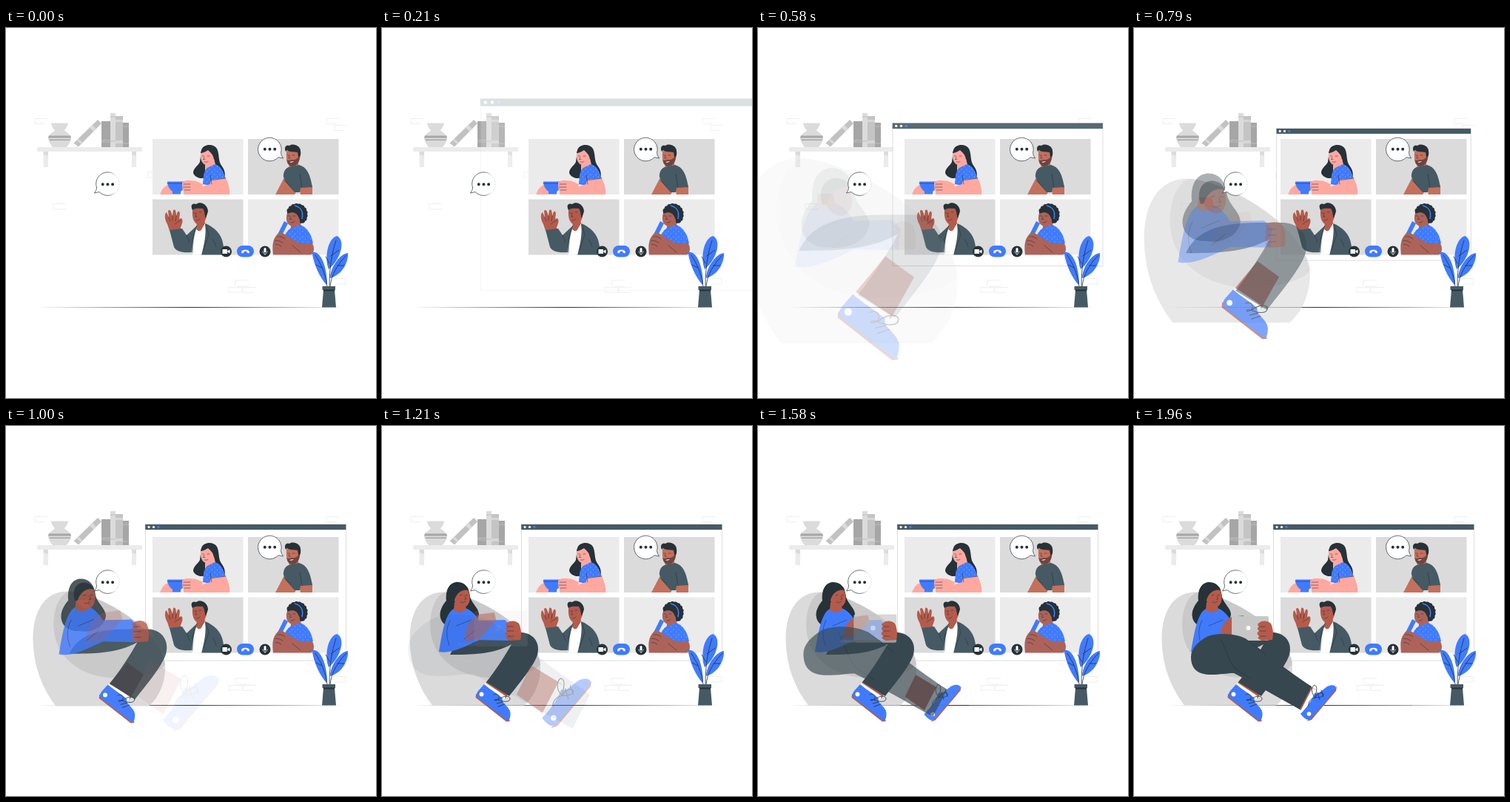
Animation, 500 px wide and 500 px high, one loop 2 s. Source, as an HTML page:

```html
<!DOCTYPE html>
<html lang="en">
<head>
<meta charset="utf-8">
<title>Video call</title>
<style>
html, body { margin: 0; width: 100%; height: 100%; overflow: hidden; background: #fff; }
svg { display: block; width: 100vw; height: 100vh; }
.blue { fill: #407bff; }
.dark { fill: #263238; }
.slate { fill: #455a64; }
.pant { fill: #37474f; }
.rose { fill: #ffa8a0; }
.tan { fill: #c4705c; }
.brown { fill: #ad6359; }
.skin { fill: #b55b4b; }
.white { fill: #fff; }
.line { fill: none; stroke: #263238; stroke-width: .8; stroke-linecap: round; stroke-linejoin: round; }
.thin { stroke-width: .55; }
.brick { fill: none; stroke: #e9e9e9; stroke-width: .7; }
</style>
</head>
<body>
<svg viewBox="0 0 500 500">
<defs>
  <pattern id="dots" width="7" height="7" patternUnits="userSpaceOnUse">
    <rect width="7" height="7" fill="#407bff"/>
    <circle cx="2" cy="2" r=".45" fill="#fff"/><circle cx="5.500" cy="5" r=".45" fill="#fff"/>
  </pattern>
  <linearGradient id="fade"><stop offset=".55" stop-color="#263238"/><stop offset=".85" stop-color="#e0e0e0"/></linearGradient>
  <clipPath id="upper"><path d="M198 150H450V225H198Z"/></clipPath>
  <clipPath id="lower"><path d="M198 231.500H450V306.500H198Z"/></clipPath>
</defs>

<!-- room -->
<path class="brick" d="M56 122.500H39V129.500H52M80 237.500H64V245H82M205 194.500H191.500V202H200M451 122.500H433V129.500H447M461 131.500H443.500V138.500H456M310 349V341H328M312 349H329M301 350.500H319V357H301ZM338 350.500H320V357.500H335M443 338.500H459V346H446"/>
<path class="dark" d="M41 377.500L249 377L457 377.500L249 378Z"/>
<path fill="#ebebeb" d="M42.500 161H184V167H42.500ZM50.500 167H57V188H50.500ZM170 167H176V188H170Z"/>
<path fill="#dbdbdb" d="M50.500 167H57V173L50.500 171ZM170 167H176V173L170 171Z"/>
<path fill="#dbdbdb" d="M61 128.500H84C83 135 80 137 79 138C82 142 88 144 88 148C88 154 84 158 82 161H63C61 158 57 154 57 148C57 144 63 142 66 138C65 137 62 135 61 128.500Z"/>
<path fill="#a6a6a6" d="M58 145.500H87L88 148.500H57ZM58.500 150.500H87L86.500 152H59Z"/>
<path fill="#c2c2c2" d="M124 124L129 129L98 160.500L91.500 155.500Z"/>
<path fill="#dbdbdb" d="M117 131L121.500 136L118 139.500L113 135ZM98 150L103 154.500L101 156.500L96 152Z"/>
<path fill="#a6a6a6" d="M129 126H141V161H129ZM158 128H166V161H158Z"/>
<path fill="#dbdbdb" d="M141 115H148V161H141Z"/>
<path fill="#c4c4c4" d="M148 119H158V161H148Z"/>
<path fill="none" stroke="#bdbdbd" d="M129 151.500H141M129 154H141M141 120H148M141 153H148M158 133H166M158 156H166"/>
<path fill="#d6d6d6" d="M148 124H158V127H148ZM148 152H158V156H148Z"/>

<!-- call window -->
<g id="window">
  <rect class="white" x="188.500" y="133" width="271" height="184" stroke="#c7c7c7" stroke-width=".6"/>
  <rect class="slate" x="188.200" y="133" width="271.200" height="7.200"/>
  <circle class="white" cx="193" cy="136.600" r="1.600"/><circle class="white" cx="199.500" cy="136.600" r="1.600"/>
  <circle class="blue" cx="206" cy="136.600" r="1.600"/>
</g>
<path fill="#ebebeb" d="M198 150H320.500V225H198ZM327 231.500H449.500V306.500H327Z"/>
<path fill="#dbdbdb" d="M327 150H449.500V225H327ZM198 231.500H320.500V306.500H198Z"/>

<g clip-path="url(#upper)">
  <!-- woman with bowl -->
  <path class="dark" d="M264 165C266 157 280 155 285 163C289 171 286 180 292 187C297 194 297 202 293 206L270 202C262 205 255 201 253 196C253 189 260 186 262 181Z"/>
  <path class="rose" d="M269 181L269 196L284 189L281 176Z"/>
  <path class="rose" d="M263 169C266 164 276 163 280 169C283 176 278 184 273 185C266 186 262 179 263 169Z"/>
  <path class="dark" d="M263 169C264 159 281 156 285 167C286 174 283 180 281 177C280 171 276 168 273 165C270 167 266 169 263 169Z"/>
  <path class="line thin" d="M265 173H267.500M272 173H275M268 174.500L266.500 177.500H269M268.500 181Q271 182 273 180.500"/>
  <path fill="url(#dots)" d="M272 189L282 184C291 186 294 195 297 204L277 208L276 213L266 211C267 203 266 195 272 189Z"/>
  <path class="rose" d="M277 205L297 203C301 211 303 219 302 226H240L240 219C252 219 262 215 276 211Z"/>
  <path class="rose" d="M208 226C210 218 214 213 222 211L226 226Z"/>
  <path class="blue" d="M218 207.500H243C243 213 240 219 236 221V224.500H225V221C221 218 218 213 218 207.500Z"/>
  <path class="line thin" d="M218 210H241M276 206L297 203M276 198L278 211"/>
  <path class="rose" d="M238 209C242 204 251 206 257 207L266 211L263 221L242 222C238 220 239 217 238 216Z"/>
  <path class="line thin" d="M240 211H249M239 215H249M241 219H249"/>
  <!-- bearded man -->
  <path class="tan" d="M376 202L364 225H390L396 215L398 225H414V213Z"/>
  <path class="tan" d="M383 178L382 192L396 189L394 176Z"/>
  <path class="tan" d="M379 167C382 162 394 161 397 167C399 177 395 187 387 187C380 186 378 178 379 167Z"/>
  <path fill="#6f4440" d="M379.500 178C382 180 384 178 387 178C392 179 395 175 397 172C397 181 393 187 386 187C381 186 379.500 181 379.500 178Z"/>
  <path class="dark" d="M378 167C375 161 379 157 383 159C389 155 398 160 398 166C399 172 397 176 395 174L394 168C389 167 383 168 380 165Z"/>
  <path class="line thin" d="M381 172H383M387 172H390M383 173L382 176H384"/>
  <path class="white" d="M383 181Q386 183 389 180Z"/>
  <path class="slate" d="M382 188L396 185C407 188 411 198 414 215L398 216L397 222L390 222L376 206C378 203 374 203 375 198C376 192 378 190 382 188Z"/>
  <path class="line thin" d="M378 207L385 215M397 198L400 215"/>
</g>
<g clip-path="url(#lower)">
  <!-- waving man -->
  <path class="skin" d="M221 274L218 265C214 259 214 250 217 249L220 256L219 247C222 244 223 248 225 254L226 246C229 244 230 248 230 254L232 248C236 247 235 252 234 258L237 257C240 260 238 265 236 269L236 276Z"/>
  <path class="line thin" d="M220 256L222 261M225 254V260M230 254L229 261M228 265Q232 262 236 260"/>
  <path class="skin" d="M258 260L257 275L270 272L268 257Z"/>
  <path class="white" d="M256 271L262 276L269 264C271 275 271 292 265 307H252Z"/>
  <path class="slate" d="M221 273L238 271L244 280L258 267C254 280 252 294 251 303C238 304 230 302 227 296Z"/>
  <path class="slate" d="M269 264C282 269 291 279 293 290L296 307H264C268 292 271 278 269 264Z"/>
  <path class="line thin" d="M244 280L248 290M258 267L252 285L252 303M270 266L274 279L267 300M280 286L284 296"/>
  <path class="skin" d="M252 245C256 240 268 240 271 247C272 257 268 266 261 266C254 265 251 257 252 245Z"/>
  <path class="dark" d="M252 246C249 240 251 236 257 238C264 233 273 240 273 248L270 257C268 253 269 248 266 244C261 244 256 243 252 246Z"/>
  <path class="line thin" d="M254 250H257M261 249H264M257 251L256 255H258M257 260Q260 261 262 258"/>
  <!-- woman with pen -->
  <path fill="none" stroke="#263238" stroke-width="7" stroke-linecap="round" stroke-dasharray="0 4" d="M383 247C387 238 401 238 404 249C405 257 402 262 396 261"/>
  <path class="dark" d="M383 248C385 240 392 239 397 240C404 243 406 252 404 258C401 264 396 263 390 260Z"/>
  <path class="brown" d="M386 262L384 274L400 271L396 258Z"/>
  <path class="brown" d="M380 250C384 244 394 244 397 251C399 260 394 268 387 268C380 267 377 259 380 250Z"/>
  <path class="dark" d="M380 251C382 242 393 240 399 250L398 261L395 255C393 250 388 247 380 251Z"/>
  <path d="M390 240C399 242 402 249 400 258" fill="none" stroke="#407bff" stroke-width="1.600"/>
  <path class="line thin" d="M381 254H383.500M388 254H391M385 255L383.500 258.500H386M385 263Q388 264 390 261"/>
  <path fill="url(#dots)" d="M386 270L398 266C408 270 413 280 415 291L392 294L375 284C378 277 381 272 386 270Z"/>
  <path class="blue" d="M376 261L381 264L373 280L368 277Z"/>
  <path class="brown" d="M368 277C372 275 376 278 381 282L397 291L414 291C417 297 417 303 412 307H361C360 295 359 286 368 277Z"/>
  <path class="line thin" d="M367 282Q373 281 377 285M364 287Q370 287 374 290M364 292Q368 292 372 295M387 294L398 303"/>
</g>

<!-- controls -->
<circle class="dark" cx="297.500" cy="302" r="7.500"/>
<path class="white" d="M292.500 299H299V305H292.500ZM299.500 301L302.500 299.500V304.500L299.500 303Z"/>
<rect class="blue" x="312" y="294" width="23" height="15.600" rx="7.800"/>
<path class="white" d="M318 303C318 298.500 329 298.500 329 303L328 304.500L325.500 303.500V301.700H321.500V303.500L319 304.500Z"/>
<circle class="dark" cx="350" cy="302" r="7.500"/>
<rect class="white" x="348.500" y="297" width="3" height="6.500" rx="1.500"/>
<path d="M347 301.500C347 306.500 353 306.500 353 301.500M350 305V307" fill="none" stroke="#fff" stroke-width=".7"/>

<!-- plant -->
<path class="blue" d="M436 326C430 312 434 285 447 281C458 285 455 310 436 326Z"/>
<path class="blue" d="M433 347C424 337 416 320 413.500 303C425 301 433 320 434 345Z"/>
<path class="blue" d="M438 338C438 324 451 305 462 304C463 314 456 333 438 338Z"/>
<path class="line" d="M446 287C440 305 437 325 437 349M437 318L432 309M439 308L450 300M418 307C426 320 432 332 434 349M427 324L419 320M460 307C447 321 440 333 438 349M448 321L457 321"/>
<path class="slate" d="M427.500 349H445V354H444L446 377.500H427L429 354H427.500Z"/>
<path class="dark" d="M429 353.500H444L444.300 355.500H428.800Z"/>

<!-- seated woman -->
<g id="bag">
  <path fill="#dbdbdb" d="M68 377.500C50 354 37.500 324 37.500 286C38 247 56 224 84 224.500C125 226 212 275 214 326C214 350 203 369 192 377.500Z"/>
  <path fill="#c9c9c9" d="M86 224.500C69 229 60 262 68 289C78 322 112 341 150 340C186 339 208 331 214 322C208 275 128 228 86 224.500Z"/>
</g>
<g id="farFoot">
  <path class="skin" d="M163 320L185 336L167 368L138 350Z"/>
  <path class="white" d="M140 347L167 365L165 370L136 352Z"/>
  <path class="skin" d="M127 362L126.500 367L168 399.500L173 399L170 393Z"/>
  <path class="blue" d="M138 349C146 356 155 361 163 368C160 374 173 379 173.500 388C173.500 395 172 399 169 398L129 367C126 364 128 361 130 358Z"/>
  <circle class="white" cx="134.500" cy="362.500" r="2.900"/>
  <path class="line" d="M151 363C156 360 161 366 156 370C151 373 150 368 157 370C164 364 172 364 173 368C173 374 164 373 157 370M155 375L163 373M157 379L166 376"/>
</g>
<g id="farPant">
  <path class="pant" d="M92 309C101 289 121 279 164 279H188C206 280 214 294 210 309C205 325 185 348 172 365L141 346C153 331 166 311 175 295C150 309 120 309 92 309Z"/>
</g>
<g id="hair">
  <path class="dark" d="M100 211C88 213 86 226 87 236C82 242 77 250 79 259C81 268 90 273 100 272C112 275 130 268 131 254C130 245 122 241 119 231C118 219 112 210 100 211Z"/>
</g>
<g id="body">
  <path class="blue" d="M122 263L166 262L174 270L172 290L124 289Z"/>
  <path class="blue" d="M99 246C86 251 82 276 77 305C96 309 121 293 132 289L131 263C126 254 118 247 112 246Z"/>
  <path class="skin" d="M98 238L97 249C104 254 110 252 114 248L112 238Z"/>
  <path class="line thin" d="M92 263C86 274 87 286 91 296M101 270L120 262M111 288L126 276"/>
</g>
<g id="face">
  <path class="skin" d="M96 224C101 217 114 217 117 224C120 231 119 241 113 244C104 247 95 238 96 224Z"/>
  <path class="dark" d="M95 236C90 223 97 213 107 214C114 215 117 219 117 222C109 220 101 225 98 235Z"/>
  <path class="line thin" d="M105 229L108 228.500M113 228.500L116 229M112 230L114 234H111.500M106 238Q110 240 113 237"/>
</g>
<g id="forearm">
  <path class="skin" d="M117 287C116 278 118 265 132 258L148 256L150 264L132 284Z"/>
</g>
<g id="tablet">
  <path fill="#c7c7c7" d="M134 257H180Q182 257 182 259V288Q182 290 180 290H135Q132 290 132 287V259Q132 257 134 257Z"/>
  <path fill="#a6a6a6" d="M117 287H133V290H117Z"/>
  <circle class="white" cx="154.500" cy="273" r="2.900"/>
</g>
<g id="hand">
  <path class="skin" d="M169 266C174 262 181 263 185 267C189 275 188 285 187 289L173 290C167 288 166 285 170 284C165 282 166 278 170 277C165 275 167 271 170 271C166 270 167 267 169 266Z"/>
  <path class="line thin" d="M169 271H177M169 277H178M170 284H178"/>
</g>
<g id="nearFoot">
  <path class="skin" d="M214 337L247 357L231 388L200 366Z"/>
  <path class="white" d="M241 354L247 357L231 389L225 385Z"/>
  <path class="skin" d="M274 352L273 358L240 397L234 399L250 378Z"/>
  <path class="blue" d="M244 361C250 363 255 356 261 352C267 349 273 350 273 354C268 363 250 384 238 396C234 399 229 394 225 389C232 382 240 372 244 361Z"/>
  <circle class="white" cx="236.500" cy="389" r="2.800"/>
  <path class="line" d="M245 367C238 361 240 351 244 350C249 352 246 360 245 367C250 358 257 360 256 364C253 367 249 367 245 367C238 368 235 374 236 378M251 370L248 360M256 366L253 357"/>
</g>
<g id="nearPant">
  <path class="pant" d="M77 312C77 301 86 292 98 285C111 279 136 280 150 287C174 303 207 331 240 352L224 383C193 366 161 347 135 334C126 334 117 336 104 336C88 336 77 330 77 312Z"/>
  <path class="line thin" d="M117 288C124 300 127 316 136 327M136 327L157 341M150 287L178 309"/>
</g>

<!-- speech bubbles -->
<path class="white" stroke="url(#fade)" stroke-width=".7" stroke-linejoin="round" d="M126 221.500L119.500 223Q122.500 219 122.600 216A15.800 15.800 0 1 1 126 221.500Z"/>
<path class="white" stroke="#263238" stroke-width=".7" stroke-linejoin="round" d="M368 174.700L374.500 176Q371.500 172 371.500 168.500A15.800 15.800 0 1 0 368 174.700Z"/>
<path fill="none" stroke="#263238" stroke-width="4" stroke-linecap="round" stroke-dasharray="0 6.700" d="M130.700 211.200H144.500M349.800 163.800H363.500"/>
</svg>
<script>
const LOOP = 2000;

// Cubic easing from two control points
function bezier(x1, y1, x2, y2) {
  const axis = (a, b, u) => 3 * a * u * (1 - u) ** 2 + 3 * b * u * u * (1 - u) + u ** 3;
  return x => {
    if (x <= 0) return 0;
    if (x >= 1) return 1;
    let lo = 0, hi = 1;
    for (let i = 0; i < 24; i++) {
      const mid = (lo + hi) / 2;
      if (axis(x1, x2, mid) < x) lo = mid; else hi = mid;
    }
    return axis(y1, y2, lo);
  };
}
const spring = bezier(.36, -.01, .5, 1.38);
const smooth = bezier(.42, 0, .58, 1);

// id, centre x, centre y, first scale, start, duration, easing
const parts = [
  ["window", 324, 225, 1.5, -15, 1000, spring],
  ["bag", 126, 301, 1.72, 430, 630, smooth],
  ["farFoot", 151, 335, 2, 320, 780, smooth],
  ["farPant", 151, 322, 1.7, 380, 850, smooth],
  ["hair", 105, 240, 1.8, 445, 800, smooth],
  ["body", 134, 268, 1.5, 445, 800, smooth],
  ["hand", 134, 268, 1.5, 445, 800, smooth],
  ["face", 106, 231, 1.7, 445, 800, smooth],
  ["forearm", 134, 271, 1.6, 600, 1150, smooth],
  ["tablet", 149, 273, 1.5, 1000, 950, smooth],
  ["nearFoot", 249, 374, 1.6, 830, 880, smooth],
  ["nearPant", 158.5, 332, 1.55, 1035, 925, smooth]
].map(([id, ...rest]) => [document.getElementById(id), ...rest]);

function draw(now) {
  const t = now % LOOP;
  for (const [el, cx, cy, from, start, span, ease] of parts) {
    const p = ease((t - start) / span);
    const s = from + (1 - from) * p;
    el.setAttribute("transform", `translate(${cx} ${cy}) scale(${s}) translate(${-cx} ${-cy})`);
    el.setAttribute("opacity", Math.max(0, Math.min(1, p)));
  }
}

const begin = performance.now();
function tick() {
  draw(performance.now() - begin);
  requestAnimationFrame(tick);
}
tick();
</script>
</body>
</html>
```
